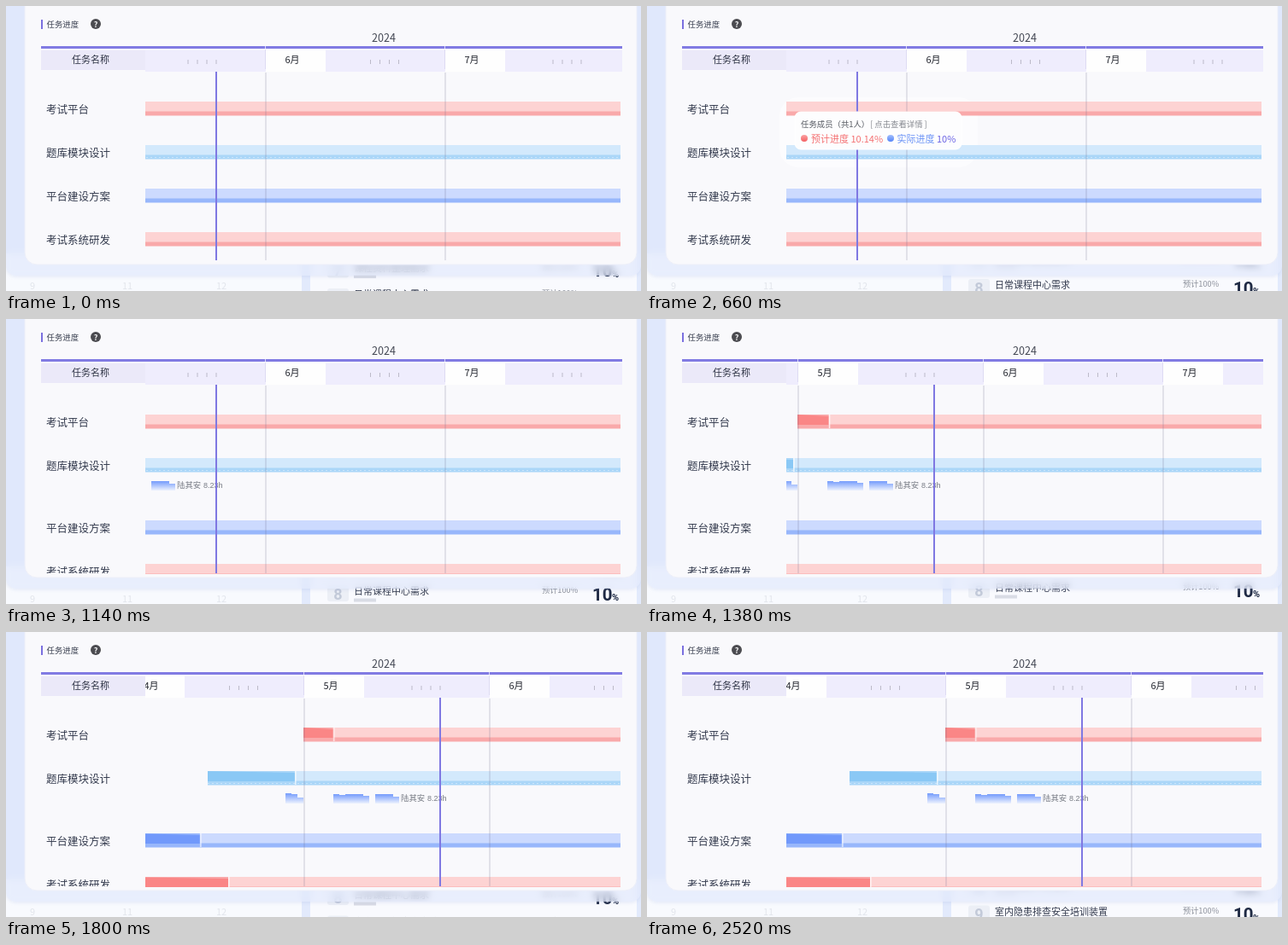
Animation, 743 px wide and 334 px high, one loop 2580 ms. Source, as an HTML page:

```html
<!DOCTYPE html>
<html lang="zh">
<head>
<meta charset="utf-8">
<title>任务进度</title>
<style>
  html, body { margin: 0; width: 100%; height: 100%; overflow: hidden; }
  body { position: relative; background: #e2eafc; font-family: "Noto Sans CJK SC", "Noto Sans CJK", sans-serif; }
  svg, .modal { position: absolute; left: 0; top: 0; }
  svg { display: block; width: 743px; height: 334px; }
  text { dominant-baseline: central; white-space: pre; }
  .modal {
    width: 743px; height: 316px; border-radius: 0 0 12px 12px;
    background: rgba(223, 231, 252, .62);
    backdrop-filter: blur(4px);
    box-shadow: 0 1px 4px rgba(150, 170, 225, .22);
  }
  .mid { text-anchor: middle; }
  .num { font-family: Roboto, sans-serif; font-weight: 700; }
  .feed { animation: feed 2580ms steps(43) infinite; }
  .drag { animation: drag 2580ms infinite; }
  .drop { animation: drop 2580ms step-end infinite; }
  .member { animation: member 2580ms step-end infinite; }
  .tip { animation: tip 2580ms step-end infinite; }
  .done { animation: done 2580ms infinite; }
  @keyframes feed { to { transform: translateY(-43px); } }
  @keyframes drag {
    0%, 46.51% { transform: translateX(0); animation-timing-function: steps(2); }
    51.16% { transform: translateX(50px); animation-timing-function: steps(2); }
    55.81% { transform: translateX(130px); animation-timing-function: steps(2); }
    60.46% { transform: translateX(206px); animation-timing-function: steps(2); }
    65.11% { transform: translateX(244px); animation-timing-function: steps(2); }
    69.76% { transform: translateX(262px); animation-timing-function: steps(2); }
    74.41%, 100% { transform: translateX(263px); }
  }
  @keyframes drop { 0% { transform: none; } 30.23%, 100% { transform: translateY(22px); } }
  @keyframes member { 0% { opacity: 0; } 30.23%, 100% { opacity: 1; } }
  @keyframes tip {
    0% { opacity: 0; }
    13.95% { opacity: .5; }
    16.27% { opacity: 1; }
    39.53%, 100% { opacity: 0; }
  }
  @keyframes done {
    0%, 60.46% { transform: scaleX(1.05); animation-timing-function: steps(4); }
    69.76%, 100% { transform: none; }
  }
</style>
</head>
<body>
<svg viewBox="0 0 743 334">
  <rect y="290" width="346" height="44" fill="#f8fafe"/>
  <rect x="356" y="290" width="382" height="44" fill="#f9fafe"/>
  <g class="mid" font-size="11" fill="#e2e5ec">
    <text x="31" y="327">9</text><text x="142" y="327">11</text><text x="252" y="327">12</text>
  </g>
  <g class="feed" id="feed"></g>
</svg>
<div class="modal"></div>
<svg viewBox="0 0 743 334">
  <defs>
    <clipPath id="head"><rect x="163" y="46" width="558" height="32"/></clipPath>
    <clipPath id="plot"><rect x="163" y="76" width="556" height="223"/></clipPath>
    <clipPath id="side"><rect x="41" y="76" width="122" height="222"/></clipPath>
    <linearGradient id="load" x2="0" y2="1">
      <stop stop-color="#749bfc"/><stop offset="1" stop-color="#edf2fe"/>
    </linearGradient>
    <linearGradient id="red" x2="0" y2="1"><stop stop-color="#fba3a3"/><stop offset="1" stop-color="#f45f62"/></linearGradient>
    <linearGradient id="blue" x2="0" y2="1"><stop stop-color="#a3bffd"/><stop offset="1" stop-color="#5484f8"/></linearGradient>
  </defs>

  <rect x="22" y="-20" width="716" height="323" rx="14" fill="#f9f9fc" stroke="#eceef8"/>
  <rect x="41" y="16" width="2" height="11" fill="#7a70df"/>
  <text x="47.5" y="20.5" font-size="9.4" fill="#3c4252">任务进度</text>
  <circle cx="105" cy="21" r="6" fill="#4b4b50"/>
  <text class="mid" x="105" y="21" font-size="9" font-weight="700" fill="#fff">?</text>
  <text class="mid" x="442" y="36" font-size="12.6" fill="#444854">2024</text>
  <rect x="41" y="52" width="122" height="23" fill="#ebe9f9"/>
  <text class="mid" x="99" y="62" font-size="11" fill="#2f3445">任务名称</text>
  <rect x="41" y="47" width="680" height="3" fill="#817be3"/>

  <g clip-path="url(#head)"><g class="drag" id="months"></g></g>

  <g class="tip"><rect x="155" y="107" width="232" height="82" rx="22" fill="#fff" opacity=".55"/></g>

  <g clip-path="url(#plot)">
    <g class="drag">
      <g id="bars"></g>
      <g class="member">
        <g id="loads" fill="url(#load)"></g>
        <text x="200" y="194" font-size="9.4" fill="#777b84">陆其安</text>
        <text x="231" y="195" font-size="9" fill="#777b84" font-family="Liberation Sans, Arial, sans-serif">8.23h</text>
      </g>
      <g id="lines" fill="#6e6e8c" opacity=".17"></g>
      <rect x="245" y="77" width="2" height="221" fill="#7f78e2"/>
    </g>
  </g>
  <g clip-path="url(#side)" id="names" font-size="12.5" fill="#333a4d"></g>

  <g class="tip">
    <rect x="173" y="124" width="195" height="44" rx="7" fill="#fdfdfe" stroke="#fff"/>
    <g font-size="9.4">
      <text x="180" y="138" fill="#555961">任务成员（共1人）</text>
      <text x="261" y="138" fill="#85888f">[ 点击查看详情 ]</text>
    </g>
    <circle cx="184" cy="155" r="4" fill="url(#red)"/>
    <circle cx="285" cy="155" r="4" fill="url(#blue)"/>
    <g font-size="11">
      <text x="192" y="155" fill="#f47072">预计进度 10.14%</text>
      <text x="292.5" y="155" fill="#6b93f6">实际进度 <tspan fill="#6a62e4">10%</tspan></text>
    </g>
  </g>
</svg>
<script>
  const put = (id, html) => { document.getElementById(id).innerHTML = html; };
  const rect = (x, y, w, h, fill, more = '') =>
    `<rect x="${x}" y="${y}" width="${w}" height="${h}" fill="${fill}" ${more}/>`;

  // Task list behind the dialog
  const feed = [[7, '课程资料整理需求'], [8, '日常课程中心需求'], [9, '室内隐患排查安全培训装置'], [10, '课程资料整理需求']];
  put('feed', feed.map(([n, name], i) => {
    const y = 305.5 + 31.5 * i;
    return rect(376, y - 6, 25, 19, '#eceff6', 'rx="3"') +
      `<text class="num mid" x="388.5" y="${y + 4}" font-size="18" fill="#c3cad9">${n}</text>
       <text x="407" y="${y}" font-size="11" fill="#333a4d">${name}</text>` +
      rect(407, y + 9.5, 26, 4, '#d9dce5') +
      `<text x="627" y="${y - 1}" font-size="9.2" fill="#8b8f99">预计100%</text>
       <text class="num" x="686" y="${y + 4.5}" font-size="20.5" fill="#1f2a44">10</text>
       <text class="num" x="709" y="${y + 8.5}" font-size="11" fill="#1f2a44">%</text>`;
  }).join(''));

  // Month header, 7 px per day
  const months = [[4, -123, 210], [5, 87, 217], [6, 304, 210], [7, 514, 217]];
  put('months', months.map(([m, x, w]) => {
    const mid = x + 70 + (w - 70) / 2 - 1;
    const ticks = [-16.5, -5.5, 5.5, 16.5].map(d => rect(mid + d - .5, 63, 1, 5, '#bcbac9')).join('');
    return rect(x, 51, 70, 26, '#fefefe') + rect(x + 70, 52, w - 70, 25, '#efedfd') + ticks +
      rect(x - 1, 47, 1, 3, '#fff', 'opacity=".7"') + rect(x - 1, 51, 1, 23, '#dedbf3') +
      `<text class="mid" x="${x + 31}" y="62" font-size="11" fill="#22252e">${m}月</text>`;
  }).join(''));
  put('lines', months.map(([, x]) => `<rect x="${x - 1}" y="78" width="2" height="220"/>`).join(''));

  const red = ['#fdd3d3', '#f9a9aa', '#fa8686'];
  const sky = ['#d3e9fc', '#aad6f8', '#8ac8f5'];
  const blue = ['#ccdafe', '#98b7fb', '#7199fb'];
  // name, top, start, finished width, colours, moves down on expand
  const tasks = [
    ['考试平台', 112, 86, 35, red, ''],
    ['题库模块设计', 163, -26, 102, sky, ''],
    ['平台建设方案', 214, -119, 84, blue, 'drop'],
    ['考试系统研发', 265, -142, 140, red, 'drop']
  ];
  put('bars', tasks.map(([, y, x, w, [pale, strip, solid], move]) => {
    const dots = pale === sky[0]
      ? `<path d="M${x} ${y + 14.5}H900" stroke="#fff" stroke-dasharray="2 3" opacity=".4"/>` : '';
    return `<g class="${move}">` + rect(x, y, 1000, 12, pale) + rect(x, y + 11.5, 1000, 5, strip) + dots +
      `<g class="done" style="transform-origin:${x}px 0">` + rect(x, y, w, 3, strip) +
      `<path d="M${x} ${y}L${x + w} ${y + 2}V${y + 12}H${x}Z" fill="${solid}"/>` +
      rect(x + w, y, 1.5, 16, '#fff', 'opacity=".75"') + '</g></g>';
  }).join(''));
  put('names', tasks.map(([name, y, , , , move]) =>
    `<text class="${move}" x="47" y="${y + 8}">${name}</text>`).join(''));

  // Daily workload: start and top of each day
  const loads = [[65, [189, 190, 194]], [121, [190, 191, 190, 190, 190, 192]], [170, [190, 190, 190, 193]]];
  put('loads', loads.map(([x, tops]) =>
    `<path d="M${x} 201${tops.map((y, i) => `V${y}H${x + 7 * (i + 1)}`).join('')}V201Z"/>`).join(''));
</script>
</body>
</html>
```
